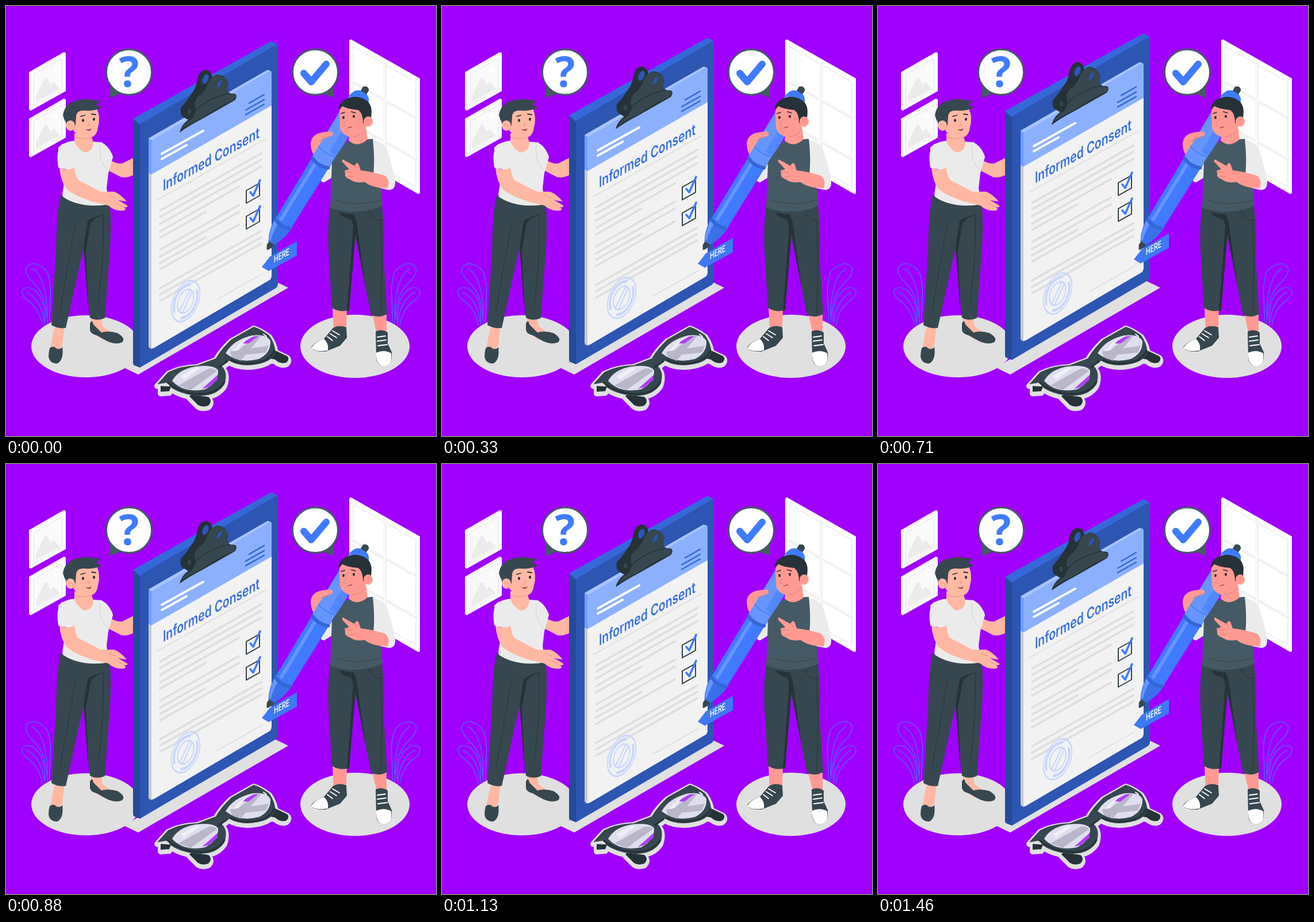
Write an HTML page that moves like this. It is 748x748 px and loops after 1500 ms.

```html
<!DOCTYPE html>
<html lang="en">
<head>
<meta charset="utf-8">
<title>Informed consent</title>
<style>
html, body { margin: 0; height: 100%; overflow: hidden; background: #a000ff; }
svg { display: block; width: 100vw; height: 100vh; }
.line { fill: none; stroke-linecap: round; stroke-linejoin: round; }
.dark { fill: #37474f; }
.deep { fill: #263238; }
.skin { fill: #ffb8a3; }
.rose { fill: #ff9a93; }
.blue { fill: #407bff; }
.white { fill: #fff; }
.grey { fill: #e0e0e0; }
.cloth { fill: #ebebeb; }
</style>
</head>
<body>
<svg viewBox="0 0 748 748">
  <defs>
    <g id="picture">
      <path class="white" d="M40 115 101 80 104 82V148L43 182 40 180Z"/>
      <path class="line" stroke="#eadff2" d="M43 116V181M43 116 103 82"/>
      <path fill="#fafafa" stroke="#e6dcee" d="M48 119 98 91V145L48 173Z"/>
      <path fill="#ebebeb" d="M52 167V157L67 126Q70 122 73 128L78 138 81 134Q84 131 87 137L94 144Z"/>
      <ellipse cx="87" cy="111" rx="3" ry="4" fill="#fff"/>
    </g>
    <g id="plant" class="line" stroke="#407bff" stroke-width="1.1">
      <path d="M76 550C74 520 82 495 73 466C65 447 39 443 35 456C31 471 51 480 61 499C70 517 70 535 72 552"/>
      <path d="M67 554C69 533 66 510 52 496C40 486 27 489 28 499C29 510 45 514 53 528Q61 541 63 556"/>
      <path d="M45 457C63 465 72 499 72 540M36 498C53 505 65 528 66 550"/>
    </g>
    <g id="checkbox" class="line">
      <path stroke="#37474f" stroke-width="2" d="M418 321 441 308V330L418 343Z"/>
      <path stroke="#407bff" stroke-width="3.6" d="M425 324 430 330 442 303"/>
    </g>
    <circle id="bubble" cx="214" cy="115" r="39.500" class="white" stroke="#455a64" stroke-width="2.800"/>
    <g id="rims">
      <path class="deep" d="M470 600 489 609Q494 614 488 620 478 624 468 615L448 611V599ZM322 676 352 680Q360 687 352 695 342 699 334 694L319 679ZM269 661 287 662 284 670 269 671Z"/>
      <path class="dark" d="M263 658 282 637Q303 626 333 625L365 613Q374 597 392 580L431 558Q442 561 458 573 470 591 468 605 460 619 438 623 409 629 388 617L375 626Q387 637 380 658 368 677 340 678 308 678 286 663L281 655Z"/>
    </g>
  </defs>

  <!-- Room -->
  <use href="#picture"/>
  <use href="#picture" y="81"/>
  <path class="white" d="M597 60 600 58 720 126V326L717 327 597 258Z"/>
  <path fill="#f3eef7" d="M597 60 600 61V259L597 258Z"/>
  <path fill="#fff" stroke="#e6dcee" d="M604 70 713 132V315L604 252Z"/>
  <g class="line" stroke="#f0f0f0" stroke-width="6">
    <path d="M659 101V283M604 132 713 194M604 204 713 266"/>
    <path stroke="#fafafa" stroke-width="3" d="M658 101V283M604 130 713 192M604 202 713 264"/>
  </g>
  <use href="#plant"/>
  <use href="#plant" transform="matrix(-1 0 0 1 748 0)"/>
  <ellipse class="grey" cx="139" cy="592" rx="95" ry="54"/>
  <ellipse class="grey" cx="607" cy="592" rx="95" ry="55"/>
  <path class="grey" d="M205 629 466 478 491 490 230 641Z"/>

  <!-- Speech bubbles -->
  <path fill="#455a64" d="M181 136V160L201 152Z"/>
  <use href="#bubble"/>
  <text x="214" y="141" text-anchor="middle" class="blue" font-family="'Open Sans', sans-serif" font-weight="700" font-size="73">?</text>
  <path fill="#455a64" d="M570 136V160L550 152Z"/>
  <use href="#bubble" x="324"/>
  <path class="line" stroke="#407bff" stroke-width="12" d="M518 117 531 132 557 101"/>

  <!-- Far arm of the left figure -->
  <path class="skin" d="M180 267Q191 275 202 274L224 263V293Q208 301 199 297L174 284Z"/>

  <g id="clipboard">
    <path fill="#264a99" d="M221 197 233 203V629L223 625Q221 624 221 620Z"/>
    <path fill="#3668d9" d="M221 196 458 63Q462 61 466 63L473 68 233 207Z"/>
    <path fill="#2d56b3" d="M233 209Q233 205 237 203L467 69Q473 66 473 73V483Q473 488 469 491L233 629Z"/>
    <path fill="#c9c9c9" d="M248 288 254 292V597L250 595Q248 594 248 591Z"/>
    <path fill="#f2f2f2" d="M253 292 462 172V469Q462 474 458 477L257 595Q253 597 253 593Z"/>
    <path fill="#a9c4ff" d="M248 230 455 111 461 113 253 235Z"/>
    <path fill="#6f9cff" d="M248 230 254 234V293L248 290Z"/>
    <path fill="#8cb0ff" d="M253 237Q253 234 256 232L457 114Q462 111 462 116V173L253 293Z"/>
    <g class="line">
      <path stroke="#fff" stroke-width="4" d="M271 257 343 217M271 266 314 242"/>
      <path stroke="#3267dc" stroke-width="2.400" d="M423 169 449 154M417 181 449 163M417 189 449 171"/>
      <path stroke="#e0e0e0" stroke-width="2" d="M264 337 452 231M368 510 446 466"/>
      <path stroke="#dedede" stroke-width="3.600" id="copy"/>
    </g>
    <text transform="matrix(.73 -.405 0 1 273 322)" fill="#3a70e8" font-family="Inter, sans-serif" font-weight="600" font-size="26.500">Informed Consent</text>
    <use href="#checkbox"/>
    <use href="#checkbox" y="45"/>
    <g transform="matrix(.75 -.4 0 1 312.500 513.500)" class="line" stroke="#c6d6fb" stroke-width="2.500">
      <circle r="33"/>
      <circle r="19"/>
      <path stroke-width="5" d="M-26 8A27 27 0 0 1 10-25M26-8A27 27 0 0 1-10 25"/>
      <path stroke-width="3" d="M-14 12 10-16M-7 17 15-11"/>
    </g>

    <path class="deep" d="M302 220Q305 207 317 198L308 193Q302 188 304 177 317 163 322 153 330 145 333 128 336 112 348 111 357 112 359 124 367 116 377 122 386 127 386 137 382 148 390 152L399 153Q403 157 398 164L340 197Q320 207 302 220Z"/>
    <path class="dark" d="M306 214Q308 207 325 195L331 181Q324 172 333 159 347 150 352 132 360 118 372 121 386 126 387 137 383 148 388 152L401 156 396 164Q380 169 340 195 320 204 306 214Z"/>
    <ellipse cx="347" cy="127" rx="5" ry="9" transform="rotate(22 347 127)" fill="#2d56b3"/>
    <path fill="#2d56b3" d="M366 143Q367 132 375 128 377 138 366 143Z"/>
    <path class="line" stroke="#263238" stroke-width="1.500" d="M331 181Q345 167 363 160T389 152"/>
    <ellipse cx="319" cy="183" rx="3" ry="5" class="dark"/>

    <path fill="#3f78f5" d="M445 454 459 436 506 409V434L457 461Z"/>
    <text transform="matrix(.66 -.36 0 1 466 447)" class="white" font-family="Roboto, sans-serif" font-weight="500" font-size="16.500">HERE</text>
  </g>

  <!-- Left figure -->
  <g>
    <path class="skin" d="M84 560 102 556 98 590Q87 606 77 596Z"/>
    <path class="skin" d="M148 540 165 539 168 557 185 570 168 581 148 564Z"/>
    <path class="dark" d="M76 595Q83 590 88 596 95 598 98 593 101 616 89 622 76 622 74 610 74 602 76 595Z"/>
    <path class="dark" d="M146 552Q150 544 152 554L166 568Q179 564 194 569 209 578 202 585 191 590 176 583L158 573Q146 570 146 563Z"/>
    <path class="dark" d="M95 330Q88 356 87 425L79 555Q90 562 104 560L135 420 146 542Q157 549 172 543L181 420Q184 371 180 344Z"/>
    <path class="deep" d="M131 444 142 374Q154 364 175 362 152 367 147 379L139 425 144 539 135 420Z"/>
    <path class="line" stroke="#263238" d="M121 377 94 529M169 362Q172 430 160 520"/>
    <path class="cloth" d="M91 246Q101 236 121 234L166 237Q181 245 186 263L178 291 175 317 180 345Q130 353 99 332L98 327 105 283 91 273Z"/>
    <path class="cloth" d="M166 237Q180 246 186 262L178 288 160 268Z"/>
    <path class="skin" d="M119 221 149 228 152 237Q152 253 136 255 124 248 119 236Z"/>
    <path class="line" stroke="#d0d0d0" d="M105 262 107 285 101 319M164 243Q160 268 177 287"/>
    <path class="skin" d="M93 281Q107 288 119 281 121 297 126 303L165 323 188 323Q199 327 210 340 202 340 194 337L211 347Q212 351 205 350 212 355 203 356 189 357 178 347L153 341Q122 332 106 319 95 305 93 281Z"/>
    <path class="cloth" d="M98 240Q86 250 91 281 106 287 121 281 127 253 118 239Z"/>
    <path class="line" stroke="#eb9481" d="M190 341 204 350M178 329 191 334"/>
    <path class="skin" d="M111 181Q130 167 158 178 165 194 160 211 158 229 143 229 125 228 115 214Z"/>
    <path class="dark" d="M117 216Q102 205 99 190 102 169 124 164 143 160 154 164 163 165 165 162 162 169 156 172 164 174 166 177 154 183 139 182 123 180 122 192L121 207Z"/>
    <ellipse class="skin" cx="112" cy="208" rx="8" ry="9"/>
    <path class="line" stroke="#eb9481" d="M108 207Q114 203 116 211M120 228Q132 233 147 229M143 201 145 207 141 208"/>
    <path class="line" stroke="#263238" stroke-width="1.800" d="M130 192 137 190M149 188 156 189"/>
    <ellipse cx="134" cy="199" rx="2" ry="2.700" class="deep"/>
    <ellipse cx="153" cy="197" rx="2" ry="2.700" class="deep"/>
    <path fill="#a94c50" d="M138 214Q144 216 149 213 146 221 138 214Z"/>
  </g>

  <!-- Sleeve and hand behind the pen -->
  <path class="cloth" d="M569 267 544 298Q547 306 553 307L571 296Z"/>
  <path class="rose" d="M548 272Q531 262 530 240 531 226 543 222L566 219 572 250Z"/>

  <!-- Pen, drawn from its tip along the x axis -->
  <g transform="translate(458 418) rotate(-58.500)">
    <path class="dark" d="M-7-1 0-5H12V5H0L-7 1Z"/>
    <path fill="#3a70e8" d="M7-6Q26-17 50-17V17Q26 17 7 6Z"/>
    <path fill="#6695ff" d="M9-6Q27-16 50-16V-8Q27-8 9-3Z"/>
    <path class="blue" d="M44-16 170-17V17L44 16Z"/>
    <path fill="#6695ff" d="M49-10H167V-4H49Z"/>
    <path fill="#6695ff" d="M169-18H300Q305 0 300 18H169Z"/>
    <path fill="#5287ff" d="M195 3H300V18H195Z"/>
    <path class="line" stroke="#3466d5" stroke-width="6" d="M45-14Q39 0 45 14M170-16Q163 0 170 16"/>
    <path class="line" stroke="#4a80f5" stroke-width="2" d="M193-17Q187 0 193 17"/>
    <path class="blue" d="M296-18Q314-17 315 0 314 17 296 18 302 0 296-18Z"/>
    <path class="dark" d="M314-6H322Q329 0 322 6H314Z"/>
  </g>

  <!-- Right figure -->
  <g>
    <path class="rose" d="M568 524H593L592 560 570 566ZM637 535 662 534 662 568 645 570Z"/>
    <path class="dark" d="M569 560Q580 554 592 559L593 577 581 591 556 601Q535 602 531 594 534 586 553 579Z"/>
    <path class="white" d="M553 579Q562 587 560 599 540 603 531 595 536 585 553 579Z"/>
    <path class="dark" d="M643 566Q654 561 664 568L664 587 671 602Q673 626 657 627 643 625 644 607Z"/>
    <path class="white" d="M644 603Q658 597 670 604 673 626 657 627 643 625 644 603Z"/>
    <path class="line" stroke="#fff" stroke-width="1.800" d="M559 575 568 582M564 570 575 577M568 565 580 572M646 576 660 574M646 583 661 581M647 591 663 589"/>
    <path class="dark" d="M564 345 654 345Q659 395 657 440L663 536Q648 544 635 537L607 397 597 529Q581 534 567 525L562 444Q558 390 564 345Z"/>
    <path class="deep" d="M579 359Q587 370 600 371L604 382 601 426 593 530 597 529 608 397 626 492 610 376 605 363Z"/>
    <path class="line" stroke="#263238" d="M631 353Q635 375 654 373M652 373Q655 450 652 535"/>
    <path class="cloth" d="M636 233Q657 235 664 253 674 284 677 306L668 319 639 310Z"/>
    <path fill="#455a64" d="M567 272 590 238 600 234 638 231Q642 266 639 294L652 317 655 347Q613 367 564 351Z"/>
    <path class="line" stroke="#37474f" d="M573 338Q609 350 652 338M599 235Q607 244 623 235"/>
    <path class="cloth" d="M658 297Q671 290 677 305 678 319 667 320L651 317Z"/>
    <path class="rose" d="M586 267 606 278Q611 269 614 277L617 286Q637 288 659 295 669 303 664 317 640 318 623 306 608 309 599 302 588 298 590 292L589 286 597 284 585 271Q584 267 586 267Z"/>
    <path class="line" stroke="#e57d7c" d="M591 288 603 289M594 297 606 297M606 278 611 283"/>
    <path class="rose" d="M536 228Q540 221 550 220L564 218Q571 220 567 226L550 232 545 240Z"/>
    <path class="line" stroke="#e57d7c" d="M545 235 551 231 566 226"/>
    <path class="rose" d="M598 219 626 209 629 232Q611 248 596 234Z"/>
    <path class="rose" d="M580 178Q595 165 622 174L627 207Q618 229 600 228 583 224 581 211Z"/>
    <path class="deep" d="M579 182Q577 171 589 163 608 153 625 163 639 171 635 194L627 208 621 203Q621 187 613 181 592 179 585 174Z"/>
    <ellipse class="rose" cx="630" cy="201" rx="8" ry="9"/>
    <path class="line" stroke="#e57d7c" d="M626 202Q631 195 634 199M592 198 587 207 593 208M603 228Q619 226 625 215"/>
    <path class="line" stroke="#263238" stroke-width="1.800" d="M583 187 589 185M601 184 608 186"/>
    <ellipse cx="587" cy="194" rx="2" ry="2.700" class="deep"/>
    <ellipse cx="605" cy="192" rx="2" ry="2.700" class="deep"/>
    <path class="line" stroke="#a94c50" stroke-width="1.500" d="M595 212 602 210"/>
  </g>

  <!-- Glasses with their pale outline -->
  <use href="#rims" y="3" stroke="#e0e0e0" stroke-width="10" stroke-linejoin="round"/>
  <use href="#rims"/>
  <g fill="#dedeee">
    <path d="M289 652Q300 632 330 627 362 623 369 634 370 654 346 667 309 674 289 652Z"/>
    <path d="M382 604Q395 581 428 573 454 570 460 583 461 604 440 614 405 623 382 604Z"/>
  </g>
  <g fill="#b9b7c9">
    <path d="M300 660 352 631Q362 629 367 635L321 668ZM392 610 433 574 444 574 408 617Z"/>
    <path fill="#b13cf5" d="M341 666 368 642 368 650 352 663ZM409 587 430 575 439 574 422 587Z"/>
    <path fill="#efeff5" d="M303 644 328 630 339 629 310 650ZM391 604 410 584 420 578 394 609Z"/>
    <path d="M390 601 457 591 452 603 392 609Z"/>
  </g>
  <path class="line" stroke="#263238" stroke-width="3" d="M281 655Q307 675 340 675 367 674 380 654M391 616Q418 627 445 618 462 613 467 599M371 628 385 618"/>
  <path class="line" stroke="#fff" stroke-width="2" d="M448 571 453 575"/>
</svg>
<script>
const clipboard = document.getElementById("clipboard");
const slope = 0.567, left = 268;

// Each row of body copy: left-hand height and right-hand end
const rows = [[356, 444], [367, 444], [379, 444], [392, 405], [403, 347],
  [424, 405], [436, 405], [447, 347], [458, 405], [491, 444], [502, 444], [513, 444]];
document.getElementById("copy").setAttribute("d", rows.map(([y, end]) =>
  `M${left} ${y}L${end} ${y - (end - left) * slope}`).join(""));

const loop = 1500, poses = 36, rise = 13.4;

function draw(now) {
  const pose = Math.floor(((now % loop) + 4) / loop * poses) % poses;
  const lift = rise / 2 * (1 - Math.cos(2 * Math.PI * pose / (poses - 1)));
  clipboard.setAttribute("transform", `translate(0 ${-lift})`);
}

const start = performance.now();
function tick() {
  draw(performance.now() - start);
  requestAnimationFrame(tick);
}
tick();
</script>
</body>
</html>
```
